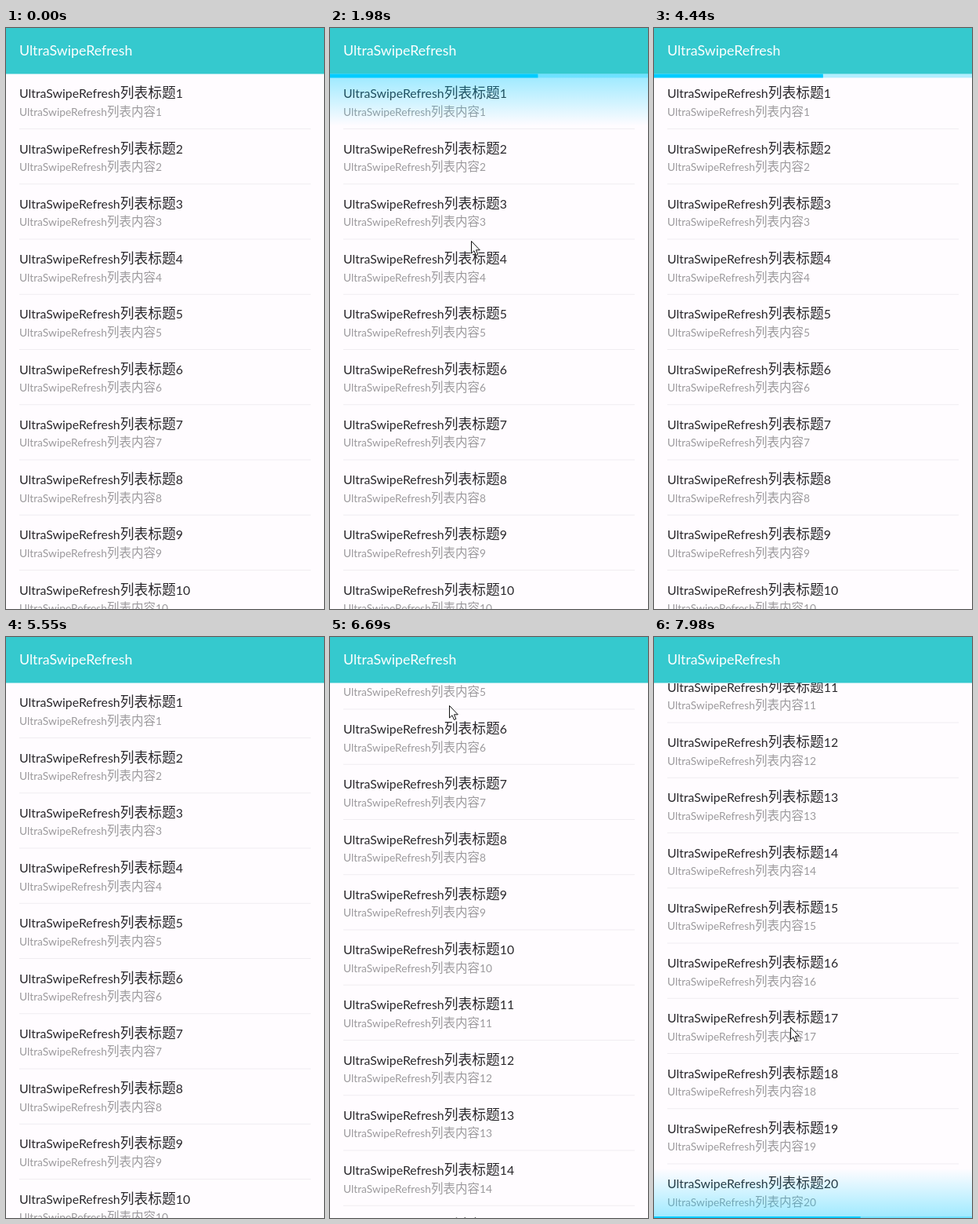
Animation of 406 by 740 pixels, one loop 8 s. Source, as an HTML page with a canvas:

```html
<!DOCTYPE html>
<html lang="zh">
<head>
<meta charset="utf-8">
<title>UltraSwipeRefresh</title>
<style>
  html, body { margin: 0; width: 100%; height: 100%; overflow: hidden; background: #fffcff; }
  canvas { display: block; width: 406px; height: 740px; }
</style>
</head>
<body>
<canvas id="stage"></canvas>
<script>
const W = 406, H = 740, LOOP = 8000, TICK = 30;
const BAR_H = 58.5, ROW_H = 70.25, ROWS = 20, MAX_SCROLL = 722;
const BOTTOM = 743, GLOW_H = 66, LINE_H = 4.9;
const SLOP = 20, PULL = 130;
const REFRESH_START = 3216, REFRESH_END = 5550;
const ACCENT = '0,204,255';
const NAME = 'UltraSwipeRefresh';

const canvas = document.getElementById('stage');
const ctx = canvas.getContext('2d');
const dpr = window.devicePixelRatio || 1;
canvas.width = W * dpr;
canvas.height = H * dpr;

// Pointer stops: time, position, power of the easing that leads there
const stop = (t, x, y, power = 1) => ({ t, x, y, power });
const pullDown = [
  stop(90, 378, 94), stop(750, 192, 166), stop(960, 192, 166), stop(1980, 180, 271),
  stop(3150, 176, 370, 2), stop(3330, 319, 345), stop(3700, 408, 368)
];
const flingAndPullUp = [
  stop(5760, 402, 484), stop(6570, 172, 637), stop(6690, 152, 87), stop(6720, 145, 18),
  stop(6990, 92, 243), stop(7400, 172, 601), stop(LOOP, 174, 493)
];

const arrow = new Path2D('M0 0V15.5L3.5 12.3L6 18L8.4 17L6 11.3H10.8Z');

const clamp = v => Math.max(0, Math.min(1, v));
const mix = (a, b, u) => a + (b - a) * u;
const phase = (t, from, to) => clamp((t - from) / (to - from));
const smooth = u => u * u * (3 - 2 * u);

// Cubic curve with control points (x1, 0) and (x2, 1)
function ease(x1, x2, x) {
  let lo = 0, hi = 1;
  for (let n = 0; n < 24; n++) {
    const s = (lo + hi) / 2, r = 1 - s;
    if (3 * s * r * r * x1 + 3 * s * s * r * x2 + s * s * s < x) lo = s; else hi = s;
  }
  return smooth(lo);
}

function pointer(t) {
  const stops = t < 5000 ? pullDown : flingAndPullUp;
  const next = stops.findIndex(s => s.t > t);
  if (next < 1) return null;
  const a = stops[next - 1], b = stops[next];
  const u = phase(t, a.t, b.t) ** b.power;
  return { x: mix(a.x, b.x, u), y: mix(a.y, b.y, u) };
}

const scrollAt = t => MAX_SCROLL * smooth(phase(t, 6570, 6831));
const edgeAt = t => 59 * Math.sin(Math.PI * phase(t, 6820, 7350) ** 0.7);

function label(parts, x, y, color) {
  ctx.fillStyle = color;
  for (const [text, size] of parts) {
    ctx.font = `${size}px Lato, "Noto Sans CJK SC", "Noto Sans CJK", sans-serif`;
    ctx.fillText(text, x, y);
    x += ctx.measureText(text).width;
  }
}

function drawList(scroll) {
  for (let n = 1; n <= ROWS; n++) {
    const top = BAR_H + (n - 1) * ROW_H - scroll;
    if (top > H || top + ROW_H < BAR_H) continue;
    label([[NAME, 15.85], ['列表标题', 17.8], [n, 15.85]], 17, top + 30.8, '#2a282c');
    label([[NAME, 13.8], ['列表内容', 15.5], [n, 13.8]], 17, top + 53.3, '#9c9a9d');
    ctx.fillStyle = '#f0edf1';
    ctx.fillRect(17, top + 69.5, 372, 1);
  }
}

// Overscroll arc: a wide circle flattened against the bottom edge
function drawEdge(h) {
  if (h < 0.5) return;
  const radius = 1.2 * W;
  const ry = h / (1 - Math.cos(Math.PI / 6));
  ctx.fillStyle = `rgba(90,75,100,${0.14 * clamp(h / 40)})`;
  ctx.beginPath();
  ctx.ellipse(W / 2, BOTTOM - 1 - h + ry, radius, ry, 0, 0, Math.PI * 2);
  ctx.fill();
}

function drawGlow(from, to) {
  const g = ctx.createLinearGradient(0, from, 0, to);
  g.addColorStop(0, `rgba(${ACCENT},0.4)`);
  g.addColorStop(1, `rgba(${ACCENT},0)`);
  ctx.fillStyle = g;
  ctx.fillRect(0, Math.min(from, to), W, Math.abs(to - from));
}

function drawLine(y, spans) {
  ctx.fillStyle = `rgba(${ACCENT},0.3)`;
  ctx.fillRect(0, y, W, LINE_H);
  ctx.fillStyle = `rgb(${ACCENT})`;
  for (const [tail, head] of spans) {
    if (head > tail) ctx.fillRect(tail * W, y, (head - tail) * W, LINE_H);
  }
}

function runningSpans(ms) {
  const c = ms % 1800;
  const part = (from, to, x1, x2) => ease(x1, x2, phase(c, from, to));
  return [
    [part(333, 1183, 0.4, 1), part(0, 750, 0.2, 0.8)],
    [part(1267, 1800, 0.1, 0.45), part(1000, 1567, 0, 0.65)]
  ];
}

function drawPull(distance, edge, inward, lineY) {
  const pull = clamp((distance - SLOP) / PULL);
  if (!pull) return;
  drawGlow(edge, edge + inward * GLOW_H);
  drawLine(lineY, [[0, pull]]);
}

function drawIndicators(t, p) {
  if (t >= REFRESH_START && t < REFRESH_END) {
    drawLine(BAR_H, runningSpans(t - REFRESH_START));
  } else if (t > 960 && t < REFRESH_START) {
    drawPull(p.y - 166, BAR_H, 1, BAR_H);
  } else if (t > 7400) {
    drawPull(601 - p.y, BOTTOM, -1, BOTTOM - LINE_H);
  }
}

function drawPointer({ x, y }) {
  ctx.save();
  ctx.translate(x + 0.5, y + 0.5);
  ctx.fillStyle = '#fff';
  ctx.fill(arrow);
  ctx.strokeStyle = '#111';
  ctx.stroke(arrow);
  ctx.restore();
}

function draw(t) {
  const p = pointer(t);
  ctx.setTransform(dpr, 0, 0, dpr, 0, 0);
  ctx.fillStyle = '#fffcff';
  ctx.fillRect(0, 0, W, H);
  drawList(scrollAt(t));
  drawEdge(edgeAt(t));
  ctx.fillStyle = '#35c9ce';
  ctx.fillRect(0, 0, W, BAR_H);
  label([[NAME, 17.8]], 17, 35, '#fff');
  drawIndicators(t, p);
  if (p) drawPointer(p);
}

const start = performance.now();
function frame() {
  const t = (performance.now() - start) % LOOP;
  draw(Math.floor(t / TICK) * TICK);
  requestAnimationFrame(frame);
}
frame();
</script>
</body>
</html>
```
